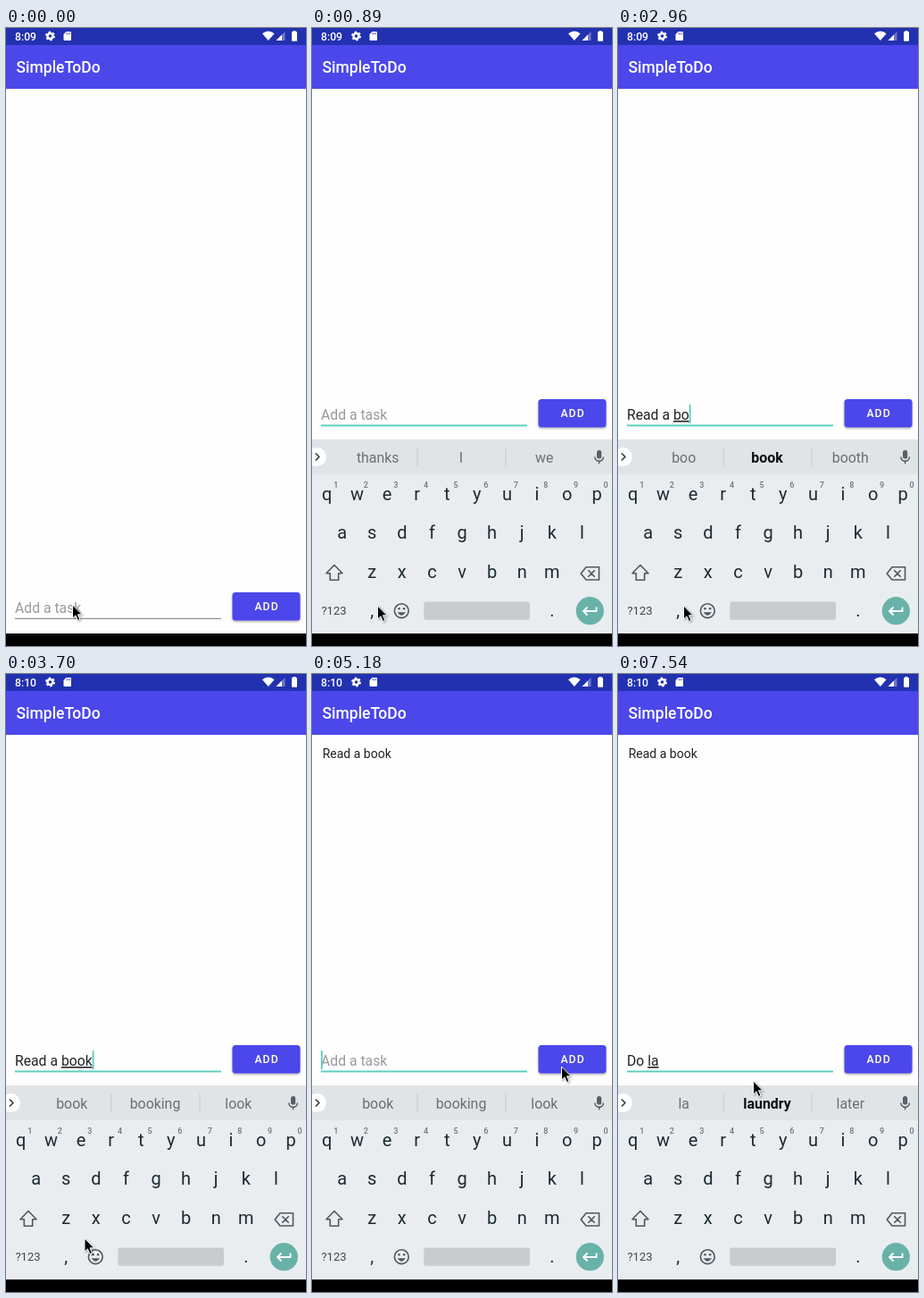
Animation of 336 by 691 pixels, one loop 7990 ms. Source, as an HTML page:

```html
<!DOCTYPE html>
<html lang="en">
<head>
<meta charset="utf-8">
<title>To-do list</title>
<style>
  html, body { margin: 0; width: 100%; height: 100%; overflow: hidden; background: #fefefe; }
  svg { display: block; width: 336px; height: 691px; font-family: Roboto, sans-serif; }
  text { white-space: pre; }
  .mid { text-anchor: middle; }
  .input { font-size: 15.75px; fill: #222; }
  .hint { fill: #9a9a9a; }
  .composing { text-decoration: underline; text-decoration-thickness: 1px; }
  .teal { fill: #56cfc0; }
  .key { font-size: 20px; fill: #1d2a32; }
  .digit { font-size: 9px; font-weight: 500; fill: #6a757c; }
  .suggestion { font-size: 15.9px; fill: #697075; }
  .suggestion.best { font-weight: 700; fill: #0b0d0e; }
  .icon { fill: none; stroke: #4d585f; stroke-width: 1.6; stroke-linejoin: round; }
</style>
</head>
<body>
<svg viewBox="0 0 336 691" xmlns="http://www.w3.org/2000/svg">
  <defs>
    <filter id="drop" x="-10%" y="-20%" width="120%" height="150%">
      <feDropShadow dx="0" dy="1.2" stdDeviation="1" flood-opacity=".35"/>
    </filter>
    <clipPath id="buttonShape"><rect x="253.5" y="631" width="76" height="31.5" rx="3.5"/></clipPath>
  </defs>
  <rect width="336" height="691" fill="#fefefe"/>

  <rect y="19" width="336" height="49" fill="#4b47ea"/>
  <rect width="336" height="19" fill="#2231b0"/>
  <text x="11.5" y="50.3" font-size="17.5" font-weight="500" fill="#fff">SimpleToDo</text>
  <g fill="#fff">
    <text id="clock" x="10" y="13.5" font-size="12.2" font-weight="500"></text>
    <g fill="none" stroke="#fff">
      <circle cx="49.5" cy="9" r="3" stroke-width="2.4"/>
      <circle cx="49.5" cy="9" r="4.6" stroke-width="1.7" stroke-dasharray="2.4 2.42"/>
    </g>
    <path d="M67.5 4H72q1 0 1 1v8q0 1-1 1h-6.5q-1 0-1-1V7z"/>
    <path d="M68 5.3v2M69.8 5.3v2M71.6 5.3v2" stroke="#2231b0" stroke-width=".8"/>
    <path d="M287 6.2q6.8-5.6 13.6 0L293.8 14z"/>
    <path d="M302.5 14L312.5 4v10z" opacity=".35"/>
    <path d="M302.5 14L309 7.5V14z"/>
    <path d="M320 4.2h1.5V3h3v1.2h1.5V14q0 .7-.7.7h-4.600q-.7 0-.7-.7z"/>
  </g>

  <text id="item" x="11.7" y="94" font-size="14" fill="#222">Read a book</text>

  <g id="form">
    <text class="input" x="10" y="654"><tspan id="done"></tspan><tspan id="composing" class="composing"></tspan></text>
    <text id="hint" class="input hint" x="10" y="654">Add a task</text>
    <rect id="idleLine" x="10" y="659.8" width="231" height="1" fill="#777"/>
    <rect id="focusLine" class="teal" x="10" y="659.5" width="231" height="1.9"/>
    <rect id="caret" class="teal" y="637" width="1.8" height="21"/>
    <rect x="253.5" y="631" width="76" height="31.5" rx="3.5" fill="#4b47ea" filter="url(#drop)"/>
    <circle id="ripple" cx="281" cy="657" fill="#fff" clip-path="url(#buttonShape)"/>
    <text class="mid" x="292.1" y="651.4" font-size="12.25" font-weight="500" letter-spacing="1.09" fill="#fff">ADD</text>
  </g>

  <g id="keyboard">
    <rect y="460" width="336" height="217" fill="#e9edf0"/>
    <rect y="460" width="336" height="39" fill="#e0e4e7"/>
    <path d="M118 469.500v20.500M217 469.500v20.500" stroke="#c5cacd"/>
    <circle cx="5.500" cy="479.500" r="10.500" fill="#fff"/>
    <path class="icon" d="M4 475.500l4 4-4 4" style="stroke:#30383d"/>
    <g id="suggestions"></g>
    <rect x="319" y="472" width="5.200" height="9.600" rx="2.600" fill="#566168"/>
    <path class="icon" d="M316.800 479.500a4.800 4.800 0 0 0 9.600 0M321.600 484.300v3" style="stroke-width:1.400"/>
    <g id="keys"></g>
    <path class="icon" d="M25 600.500l9 9.300h-4.300v7.500h-9.400v-7.500H16z"/>
    <path class="icon" d="M307 602.800h14.500v14.200H307l-5.800-7.100zM309.300 606.300l7.400 7.400m0-7.400l-7.400 7.400"/>
    <text class="mid" x="24.500" y="656.300" font-size="13" fill="#3c474e">?123</text>
    <text class="key mid" x="67.200" y="657.500" font-size="18">,</text>
    <text class="key mid" x="268.800" y="657.500" font-size="18">.</text>
    <circle class="icon" cx="100.300" cy="651.700" r="7.900"/>
    <path class="icon" d="M96 653.600q4.300 5.600 8.600 0z" style="fill:#4d585f;stroke-width:.5"/>
    <circle cx="97.500" cy="649.300" r="1.300" fill="#4d585f"/>
    <circle cx="103.100" cy="649.300" r="1.300" fill="#4d585f"/>
    <rect x="125.300" y="641.500" width="118.700" height="20.300" rx="2.500" fill="#c9cccf"/>
    <circle cx="311.300" cy="651.700" r="15.600" fill="#69b2a8"/>
    <path d="M318.500 647.500v4.500h-14.500m4.500-4.500l-4.500 4.500 4.500 4.500" fill="none" stroke="#fff" stroke-width="1.800"/>
  </g>

  <rect y="677" width="336" height="14" fill="#000"/>
  <path id="pointer" d="M0 0v15l3.400-3.200 2.500 5.700 2.600-1.100-2.500-5.600h4.700z" stroke="#fff" stroke-width="1"
        style="filter:drop-shadow(1px 1px 1px rgba(0,0,0,.35))"/>
</svg>
<script>
const LOOP = 7990;
const $ = id => document.getElementById(id);

function addText(parent, className, x, y, content = '') {
  const node = document.createElementNS('http://www.w3.org/2000/svg', 'text');
  node.setAttribute('class', className);
  node.setAttribute('x', x);
  node.setAttribute('y', y);
  node.textContent = content;
  parent.append(node);
  return node;
}

const PITCH = 33.6;
[['qwertyuiop', .5, 527.5], ['asdfghjkl', 1, 571], ['zxcvbnm', 2, 614.5]].forEach(([letters, start, y]) =>
  [...letters].forEach((letter, i) => addText($('keys'), 'key mid', (i + start) * PITCH, y, letter)));
[...'1234567890'].forEach((digit, i) => addText($('keys'), 'digit mid', 26.700 + i * PITCH, 513.500, digit));

const slots = [73.700, 167, 260.300].map(x => addText($('suggestions'), 'suggestion mid', x, 485.700));

// Each step lists only what changes; a suggestion starting with * is the bold one.
const START = {
  clock: '8:09', done: '', composing: '', words: 'thanks I we', pointer: [74.500, 645],
  focus: false, caret: false, raised: false, drop: 240, item: false, ripple: 0
};
const STEPS = [
  [0, {}],
  [150, { pointer: [73.500, 646] }],
  [450, { focus: true, caret: true }],
  [740, { raised: true, drop: 80 }],
  [890, { drop: 0, caret: false }],
  [1340, { composing: 'R', caret: true, words: 'R Read Reading' }],
  [1640, { composing: 'Re', words: 'Re Read Really' }],
  [1780, { composing: 'Rea', words: 'Rea *Read Really' }],
  [1930, { composing: 'Read', words: 'Read Ready Reading' }],
  [2080, { done: 'Read ', composing: '' }],
  [2220, { words: 'the it this' }],
  [2370, { composing: 'a', words: 'a and about' }],
  [2670, { done: 'Read a ', composing: '', words: 'book lot little' }],
  [2820, { composing: 'b', words: 'b book bit' }],
  [2960, { composing: 'bo', words: 'boo *book booth' }],
  [3110, { composing: 'boo', words: 'boo book boom' }],
  [3260, { composing: 'book', clock: '8:10' }],
  [3400, { words: 'book booking look' }],
  [3700, { pointer: [88, 631] }],
  [3850, { pointer: [132, 588] }],
  [4000, { pointer: [187, 531], caret: false }],
  [4140, { pointer: [237, 481] }],
  [4290, { pointer: [268, 450] }],
  [4430, { pointer: [279.500, 439], caret: true }],
  [4880, { ripple: 30 }],
  [5030, { ripple: 70, done: '', composing: '', item: true }],
  [5180, { ripple: 0 }],
  [5320, { pointer: [250, 443], words: 'thanks I we' }],
  [5470, { pointer: [190, 450] }],
  [5610, { pointer: [151.500, 455], caret: false }],
  [5910, { composing: 'D', caret: true, words: 'D Do Did' }],
  [6060, { composing: 'Do' }],
  [6200, { words: "Do Don't Does" }],
  [6500, { done: 'Do ', composing: '', words: 'you not it' }],
  [6650, { composing: 'l', words: 'l like last' }],
  [6940, { composing: 'la', words: 'la *laundry later' }],
  [7540, { caret: false }]
];

let state = START;
const timeline = STEPS.map(([time, change]) => ({ time, state: state = { ...state, ...change } }));

const show = (id, visible) => $(id).setAttribute('visibility', visible ? 'visible' : 'hidden');

function draw(s) {
  for (const id of ['clock', 'done', 'composing']) $(id).textContent = s[id];
  const typed = s.done + s.composing;
  show('hint', !typed);
  show('idleLine', !s.focus);
  show('focusLine', s.focus);
  show('caret', s.caret);
  show('item', s.item);
  show('keyboard', s.drop < 240);
  $('caret').setAttribute('x', 10 + (typed ? $('done').parentNode.getComputedTextLength() : 0));
  $('form').setAttribute('transform', `translate(0 ${s.raised ? -216 : 0})`);
  $('keyboard').setAttribute('transform', `translate(0 ${s.drop})`);
  $('pointer').setAttribute('transform', `translate(${s.pointer})`);
  $('ripple').setAttribute('r', s.ripple);
  $('ripple').setAttribute('opacity', s.ripple > 50 ? .15 : .22);
  s.words.split(' ').forEach((word, i) => {
    slots[i].textContent = word.replace('*', '');
    slots[i].classList.toggle('best', word[0] === '*');
  });
}

let shown;
function tick() {
  const time = performance.now() % LOOP;
  const current = timeline.findLast(step => step.time <= time);
  if (current !== shown) draw((shown = current).state);
  requestAnimationFrame(tick);
}
tick();
</script>
</body>
</html>
```
